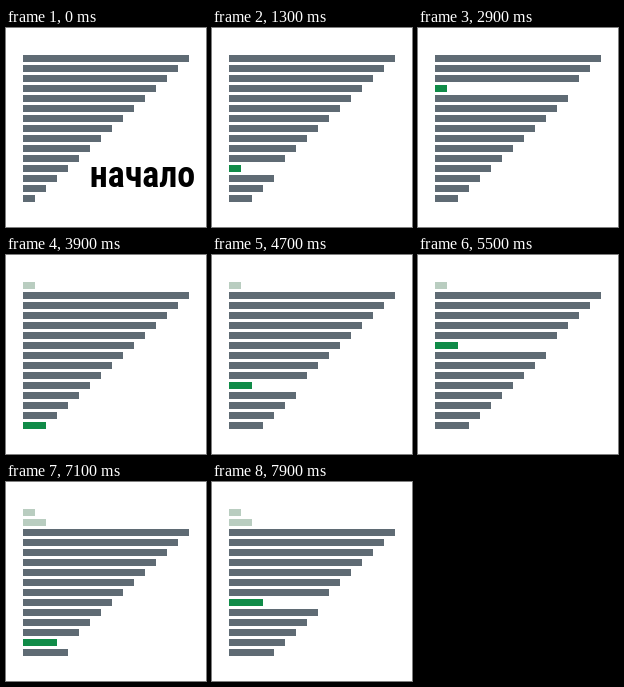
An HTML page for the animation above (8 s loop, 200 by 199 pixels).

```html
<!DOCTYPE html>
<html lang="ru">
<head>
<meta charset="utf-8">
<title>Сортировка</title>
<style>
  html, body { margin: 0; width: 100%; height: 100%; overflow: hidden; background: #fff; }
  svg { display: block; width: 100%; height: 100%; }
  text {
    font-family: "Roboto Condensed", Roboto, "Open Sans", sans-serif;
    font-weight: 700;
    font-stretch: 75%;
    text-anchor: middle;
  }
</style>
</head>
<body>
<svg viewBox="0 0 200 199">
  <g id="bars" shape-rendering="crispEdges"></g>
  <text id="label" x="136.5" y="159" font-size="36">начало</text>
</svg>
<script>
const LOOP = 8000, INTRO = 500, STEP = 200, COUNT = 15, LAST = COUNT - 1;
const GRAY = '#5f6b74', GREEN = '#108b48', PALE = '#b9cdc0';

const group = document.getElementById('bars');
const label = document.getElementById('label');
const bars = Array.from({ length: COUNT }, (_, row) => {
  const bar = document.createElementNS(group.namespaceURI, 'rect');
  bar.setAttribute('x', 17);
  bar.setAttribute('y', 27 + 10 * row);
  bar.setAttribute('height', 7);
  return group.appendChild(bar);
});

// Keep the label inside its space if only a wider font is available.
const size = 36 * Math.min(1, 107 / label.getComputedTextLength());
label.setAttribute('font-size', size);

// Each pass rests for one step, then carries the smallest bar up to its place.
function stateAt(t) {
  let step = Math.max(0, Math.floor((t - INTRO) / STEP));
  let pass = 0;
  while (step >= COUNT + 1 - pass) step -= COUNT + 1 - pass++;
  return { pass, moving: step > 0, pos: step ? COUNT - step : LAST };
}

function rankAt(row, pass, pos) {
  if (row < pass) return row;
  if (row === pos) return pass;
  return LAST - (row - pass) + (row > pos ? 1 : 0);
}

function draw(t) {
  const { pass, moving, pos } = stateAt(t);
  bars.forEach((bar, row) => {
    const color = row < pass ? PALE : moving && row === pos ? GREEN : GRAY;
    bar.setAttribute('width', 12 + 11 * rankAt(row, pass, pos));
    bar.setAttribute('fill', color);
  });
  label.setAttribute('visibility', t < INTRO ? 'visible' : 'hidden');
}

const start = performance.now();
function tick() {
  draw((performance.now() - start) % LOOP);
  requestAnimationFrame(tick);
}
tick();
</script>
</body>
</html>
```
